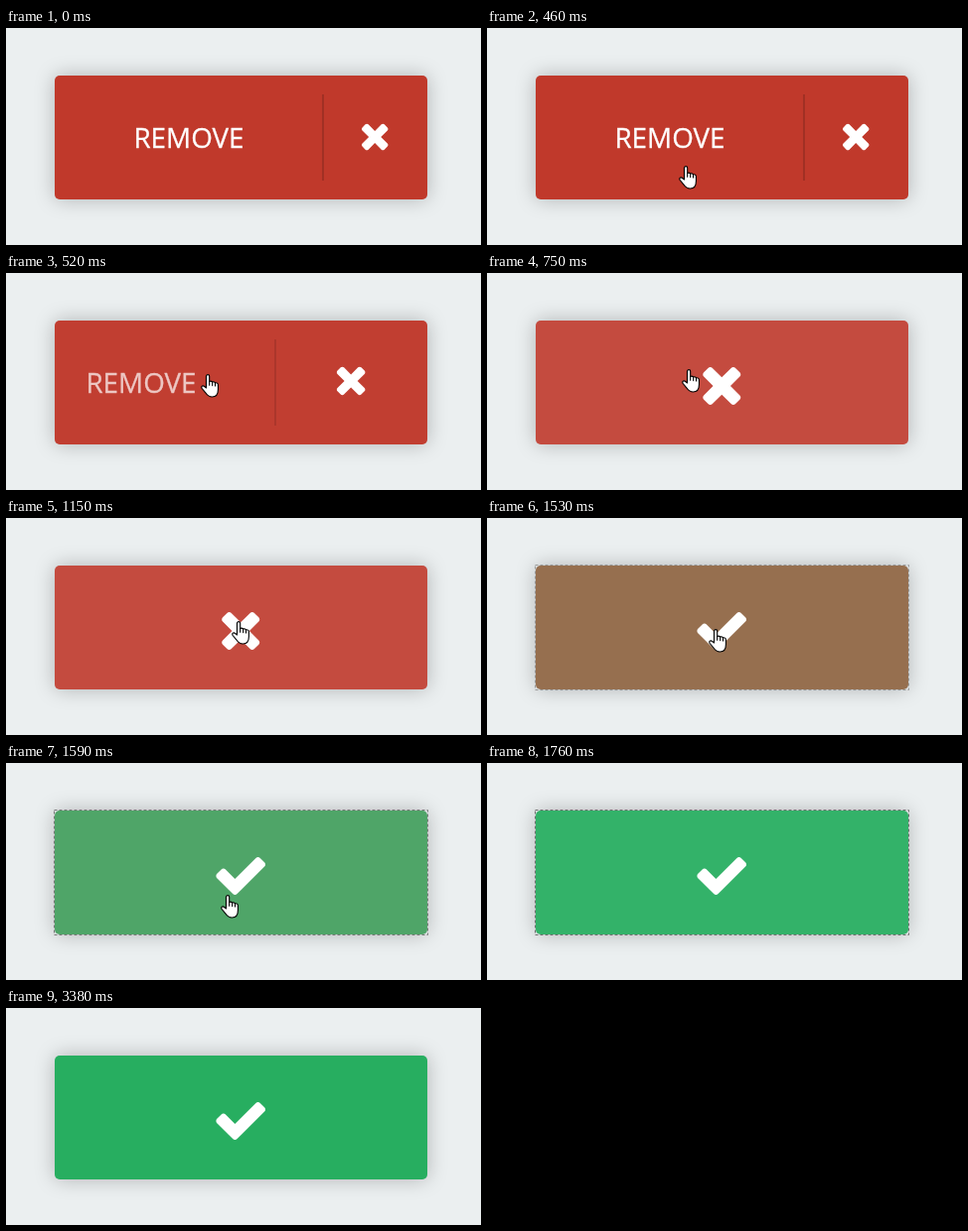
An HTML page that plays this animation: 478 by 219 pixels, repeating every 3480 ms.

```html
<!DOCTYPE html>
<html lang="en">
<head>
<meta charset="utf-8">
<title>Remove button</title>
<style>
  html, body { margin: 0; width: 100%; height: 100%; overflow: hidden; background: #ebeff0; }
  #button {
    position: absolute; left: 49px; top: 48px; width: 375px; height: 125px;
    border-radius: 5px; box-shadow: 0 0 20px rgba(0, 0, 0, .25);
  }
  svg { position: absolute; left: 0; top: 0; display: block; }
  text {
    font: 27.8px "Open Sans", "Noto Sans", sans-serif; text-anchor: middle;
    fill: #fff; stroke: #fff; stroke-width: .3px;
  }
</style>
</head>
<body>
<div id="button"></div>
<svg width="478" height="219" viewBox="0 0 478 219">
  <clipPath id="inside"><rect x="49" y="48" width="375" height="125" rx="5"/></clipPath>
  <g clip-path="url(#inside)">
    <g id="label">
      <text x="184" y="121">REMOVE</text>
      <rect x="318" y="67" width="2" height="87" opacity=".16"/>
    </g>
  </g>
  <path id="cross" fill="#fff" d="M594 362q0 40-28 68l-136 136q-28 28-68 28t-68-28l-294-294-294 294q-28 28-68 28t-68-28l-136-136q-28-28-28-68t28-68l294-294-294-294q-28-28-28-68t28-68l136-136q28-28 68-28t68 28l294 294 294-294q28-28 68-28t68 28l136 136q28 28 28 68t-28 68l-294 294 294 294q28 28 28 68z"/>
  <path id="check" fill="#fff" transform="translate(236.2 114) scale(.032) translate(-896 -928)" d="M1671 566q0 40-28 68l-724 724-136 136q-28 28-68 28t-68-28l-136-136-362-362q-28-28-28-68t28-68l136-136q28-28 68-28t68 28l294 295 656-657q28-28 68-28t68 28l136 136q28 28 28 68z"/>
  <rect id="focus" x="48.5" y="47.5" width="376" height="126" fill="none" stroke="#707070" stroke-dasharray="3 2"/>
  <g id="hand" stroke="#000" stroke-width="1.1" stroke-linejoin="round" stroke-linecap="round">
    <path fill="#fff" d="M5.5 14V2.2a1.6 1.6 0 0 1 3.2 0V7.5q1.5-1 3 .5q1.6-.7 2.8 .8q2.6-.4 2.9 2V15.5c0 5-2.5 7.5-6 7.5c-3.5 0-5.2-2-6.6-4.2L1.2 14.5q-1-1.8 .4-2.5q1.2-.5 2.4 .8z"/>
    <path fill="none" d="M8.7 7.5v3.8M11.7 8v3.6M14.5 8.8v3.2"/>
  </g>
</svg>
<script>
const LOOP = 3480, LEAVE = 1760, RESET = 3380;
const RED = [192, 57, 43], GREEN = [39, 174, 96], PAGE = [236, 240, 241];

const $ = id => document.getElementById(id);
const clamp = x => Math.min(1, Math.max(0, x));
const mix = (a, b, p) => a.map((v, i) => v + (b[i] - v) * p);
const show = (id, on) => $(id).setAttribute("visibility", on ? "visible" : "hidden");
const place = (id, x, y, s = 1) => $(id).setAttribute("transform", `translate(${x} ${y}) scale(${s})`);

// CSS "ease", cubic-bezier(.25, .1, .25, 1), solved by bisection
function ease(x) {
  if (x <= 0 || x >= 1) return clamp(x);
  let lo = 0, hi = 1;
  for (let i = 0; i < 24; i++) {
    const m = (lo + hi) / 2;
    if (.75 * m * (1 - m) + m ** 3 < x) lo = m; else hi = m;
  }
  const u = 1 - lo;
  return .3 * lo * u * u + 3 * lo * lo * u + lo ** 3;
}

const change = (t, start, length) => ease((t - start) / length);

// Swoops in, crosses to the icon, then drops out below
function moveHand(t) {
  const enter = Math.exp((460 - t) / 28);
  const cross = clamp((t - 1000) / 150);
  const drop = Math.max(0, t - 1500);
  const x = 196 - 3 * enter + 31 * cross - .12 * drop;
  const y = 97 + 44 * enter + 7 * cross + .25 * drop + .0007 * drop * drop;
  place("hand", Math.round(x), Math.round(y));
  show("hand", t >= 460 && t < LEAVE);
}

function draw(now) {
  // The pose holds once the pointer is gone, until the button resets
  const t = now < RESET ? Math.min(now, LEAVE) : now;
  const slide = change(t, 480, 280);
  const hover = change(t, 466, 280);
  const turn = change(t, 1493, 175);
  const lift = .1 * (hover - change(t, 1690, 280));

  const fill = mix(mix(RED, GREEN, turn), PAGE, lift);
  $("button").style.background = `rgb(${fill.map(Math.round)})`;

  place("label", Math.round(-270 * slide), 0);
  $("label").setAttribute("opacity", 1 - hover);

  const y = 110 - 8 * slide + 12 * slide * slide;
  place("cross", 371.2 - 135 * slide, y, (26.5 + 11.5 * slide) / 1188);
  show("cross", t < 1500);
  show("check", t >= 1500);

  show("focus", t >= 1320 && t < RESET);
  $("focus").setAttribute("opacity", .4 + .6 * turn);

  moveHand(t);
}

const start = performance.now();
function loop() {
  draw((performance.now() - start) % LOOP);
  requestAnimationFrame(loop);
}
loop();
</script>
</body>
</html>
```
